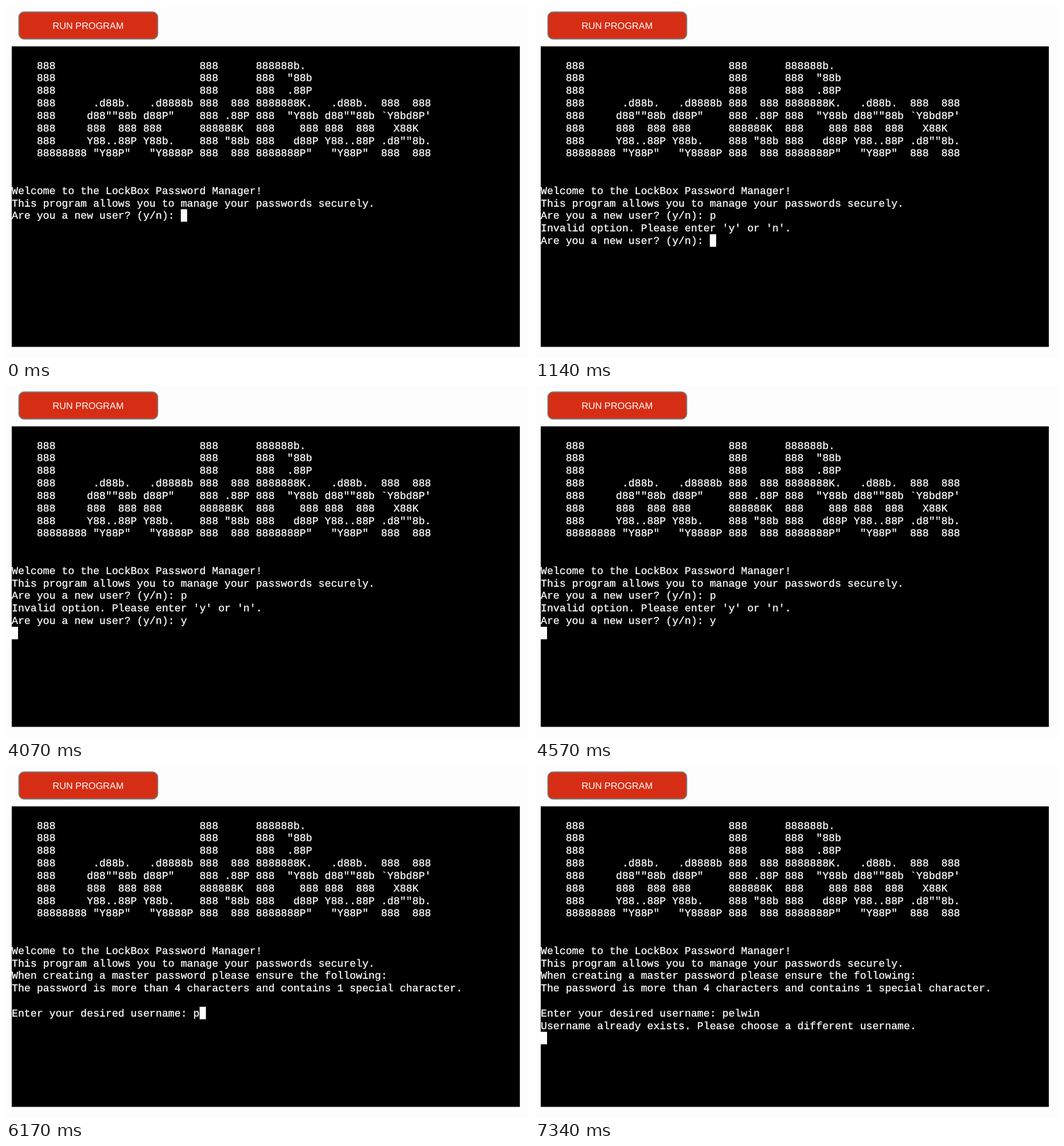
Recreate the animation shown at these times as an HTML page. Size 912 px wide and 614 px high, loop 8 s.

```html
<!DOCTYPE html>
<html lang="en">
<head>
<meta charset="utf-8">
<title>Password manager terminal</title>
<style>
  html, body { margin: 0; width: 100%; height: 100%; overflow: hidden; background: #fdfdfd; }
  svg { display: block; width: 912px; height: 614px; }
  text { fill: #fff; text-rendering: geometricPrecision; }
  .label { font: 16.3px "Liberation Sans", Arial, sans-serif; text-anchor: middle; }
  .row { font: 18.2px "Liberation Mono", "Courier New", monospace; white-space: pre; stroke: #fff; stroke-width: .3px; }
</style>
</head>
<body>
<svg viewBox="0 0 912 614">
  <rect width="912" height="614" fill="#fdfdfd"/>
  <rect x="22.5" y="10.5" width="242" height="47" rx="9" fill="#d62e15" stroke="#777" stroke-width="1.8"/>
  <text class="label" x="143.3" y="39.6">RUN PROGRAM</text>
  <rect x="10" y="70.4" width="886" height="524.2" fill="#000"/>
  <g id="screen"></g>
  <rect id="cursor" width="11" height="21.8" fill="#fff"/>
</svg>
<script>
const LOOP = 8000, LEFT = 10, TOP = 70.7, CHAR = 10.92, LINE = 21.83, ROWS = 24;

const banner = String.raw`
    888                       888      888888b.
    888                       888      888  "88b
    888                       888      888  .88P
    888      .d88b.   .d8888b 888  888 8888888K.   .d88b.  888  888
    888     d88""88b d88P"    888 .88P 888  "Y88b d88""88b ~Y8bd8P'
    888     888  888 888      888888K  888    888 888  888   X88K
    888     Y88..88P Y88b.    888 "88b 888   d88P Y88..88P .d8""8b.
    88888888 "Y88P"   "Y8888P 888  888 8888888P"   "Y88P"  888  888


Welcome to the LockBox Password Manager!
This program allows you to manage your passwords securely.
`.replace("~", "`");

const ask = "Are you a new user? (y/n): ";
const retry = ask + "p\nInvalid option. Please enter 'y' or 'n'.\n" + ask;
const signup = "When creating a master password please ensure the following:\n" +
  "The password is more than 4 characters and contains 1 special character.\n\n" +
  "Enter your desired username: ";
const user = "pelwin";
const keyTimes = [6040, 6180, 6320, 6460, 6600, 6770];

// [start time, terminal contents below the banner]
const states = [
  [0, ask],
  [340, ask + "p"],
  [1100, ask + "p\n"],
  [1140, retry],
  [3600, retry + "y"],
  [4040, retry + "y\n"],
  [4600, signup],
  ...keyTimes.map((t, i) => [t, signup + user.slice(0, i + 1)]),
  [7000, signup + user + "\n"],
  [7050, signup + user + "\nUsername already exists. Please choose a different username.\n"]
];

const screen = document.getElementById("screen");
const cursor = document.getElementById("cursor");
const rows = Array.from({ length: ROWS }, (_, i) => {
  const row = document.createElementNS("http://www.w3.org/2000/svg", "text");
  row.setAttribute("class", "row");
  row.setAttribute("x", LEFT);
  row.setAttribute("y", TOP + i * LINE + 17);
  return screen.appendChild(row);
});

let shown;
function render(t) {
  const body = states.filter(([start]) => start <= t).pop()[1];
  if (body === shown) return;
  shown = body;
  const lines = (banner + body).split("\n");
  rows.forEach((row, i) => { row.textContent = lines[i] || ""; });
  const last = lines.length - 1;
  cursor.setAttribute("x", LEFT + lines[last].length * CHAR);
  cursor.setAttribute("y", TOP + last * LINE);
}

const begin = performance.now();
function tick() {
  render((performance.now() - begin) % LOOP);
  requestAnimationFrame(tick);
}
tick();
</script>
</body>
</html>
```
